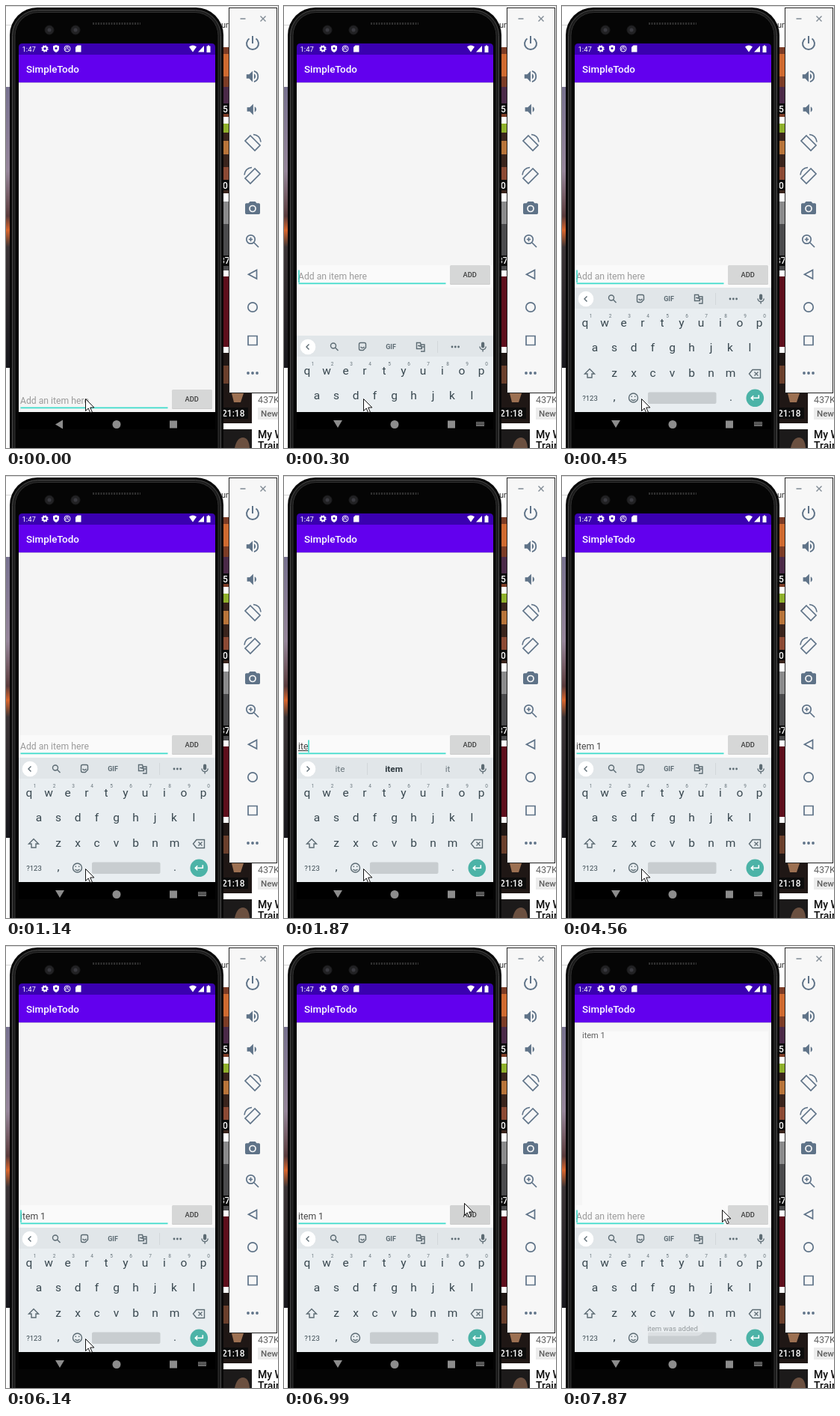
Animation of 364x590 px, one loop 8 s. Source, as an HTML page:

```html
<!DOCTYPE html>
<html lang="en">
<head>
<meta charset="utf-8">
<title>Todo app demo</title>
<style>
html, body { margin: 0; width: 100%; height: 100%; overflow: hidden; background: #fff; }
svg { display: block; }
text { font-family: Roboto, sans-serif; white-space: pre; }
.mid { text-anchor: middle; }
.tools { fill: #5f7388; stroke: #5f7388; stroke-width: 0; }
.line { fill: none; stroke-width: 2; }
.entry { font-size: 12.2px; fill: #484848; }
.typing { text-decoration: underline; }
.keys { font-size: 15.5px; fill: #38474f; }
.digits { font-size: 6.5px; fill: #68757c; }
.words { font-size: 11.8px; fill: #6b777d; }
.glyph { fill: none; stroke: #5c6b73; stroke-width: 1.4; }

.row, .board, .entries, .bars, .caret, .mouse, .press, .navUp, .navDown, .added {
  animation: 8s step-end infinite;
}
.row { animation-name: row; }
.board { animation-name: board; }
.entries { animation-name: entries; }
.bars { animation-name: bars; }
.caret { animation-name: caret; }
.mouse { animation-name: mouse; }
.press { animation-name: press; }
.navUp { animation-name: navUp; }
.navDown { animation-name: navDown; }
.added { animation-name: added; }

@keyframes row { 0% { transform: translateY(166px); } 3.75%, 100% { transform: none; } }
@keyframes board {
  0% { transform: translateY(170px); }
  3.75% { transform: translateY(64px); }
  5.625%, 100% { transform: none; }
}
/* Each entry is 24px tall, each bar 28px */
@keyframes entries {
  0%, 96.75%, 100% { transform: none; }
  20% { transform: translateY(-24px); }
  23.375% { transform: translateY(-48px); }
  25.25%, 44.5% { transform: translateY(-72px); }
  27.125% { transform: translateY(-96px); }
  48% { transform: translateY(-120px); }
  51.625% { transform: translateY(-144px); }
}
@keyframes bars {
  0%, 51.625%, 100% { transform: none; }
  20% { transform: translateY(-28px); }
  23.375% { transform: translateY(-56px); }
  25.25%, 44.5% { transform: translateY(-84px); }
  27.125% { transform: translateY(-112px); }
  48% { transform: translateY(-140px); }
}
@keyframes caret {
  0% { transform: none; opacity: 0; }
  1.875% { transform: none; opacity: 1; }
  14.25% { transform: none; opacity: 0; }
  20% { transform: translateX(6.5px); opacity: 1; }
  23.375% { transform: translateX(13px); opacity: 1; }
  25.25% { transform: translateX(24px); opacity: 1; }
  27.125% { transform: translateX(30px); opacity: 1; }
  32.875% { transform: translateX(30px); opacity: 0; }
  39.125% { transform: translateX(30px); opacity: 1; }
  44.5% { transform: translateX(24px); opacity: 1; }
  48% { transform: translateX(27px); opacity: 1; }
  51.625% { transform: translateX(34px); opacity: 1; }
  57% { transform: translateX(34px); opacity: 0; }
  63.625% { transform: translateX(34px); opacity: 1; }
  65.5% { transform: none; opacity: 1; }
  71.25% { transform: none; opacity: 0; }
  76.75% { transform: none; opacity: 1; }
  78.5% { transform: translateX(34px); opacity: 1; }
  83.875% { transform: translateX(34px); opacity: 0; }
  91.125% { transform: translateX(34px); opacity: 1; }
  96.75%, 100% { transform: none; opacity: 1; }
}
@keyframes mouse {
  0% { transform: translate(106px, 524px); }
  83.875% { transform: translate(152px, 482px); }
  85.625% { transform: translate(222px, 386px); }
  87.375% { transform: translate(241px, 343px); }
  94.875% { transform: translate(238px, 346px); }
  96.75% { transform: translate(230px, 350px); }
  98.375%, 100% { transform: translate(214px, 352px); }
}
@keyframes press { 0%, 98.375%, 100% { fill: #d6d7d7; } 87.375% { fill: #d2d3d3; } }
@keyframes navDown { 0% { opacity: 1; } 3.75%, 100% { opacity: 0; } }
@keyframes navUp { 0% { opacity: 0; } 3.75%, 100% { opacity: 1; } }
@keyframes added { 0% { opacity: 0; } 98.375%, 100% { opacity: 1; } }
</style>
</head>
<body>
<svg width="364" height="590" viewBox="0 0 364 590">
  <defs>
    <linearGradient id="city" x2="0" y2="1">
      <stop offset="0" stop-color="#77718f"/>
      <stop offset=".3" stop-color="#96869a"/>
      <stop offset=".46" stop-color="#5a3b3c"/>
      <stop offset=".51" stop-color="#d9652c"/>
      <stop offset=".57" stop-color="#3b3436"/>
      <stop offset="1" stop-color="#17171c"/>
    </linearGradient>
    <clipPath id="screen"><path d="M17 102h263v440H17z"/></clipPath>
    <clipPath id="field"><path d="M17 348h203v22H17z"/></clipPath>
    <clipPath id="strip"><path d="M17 376h263v28H17z"/></clipPath>
    <g id="mic">
      <rect x="264" y="384.500" width="4.200" height="8" rx="2.100" fill="#5c6b73"/>
      <path class="glyph" stroke-width="1.200" d="M262 390.500a4.100 4.100 0 0 0 8.200 0M266.100 394.500v3"/>
    </g>
    <g id="more">
      <circle cx="32" cy="391" r="10.300" fill="#fff"/>
      <path class="glyph" d="M30.500 387.500l3.500 3.500-3.500 3.500"/>
      <path d="M111.500 383v16M183.500 383v16" stroke="#d2d7da"/>
      <use href="#mic"/>
    </g>
  </defs>

  <!-- Page behind the emulator -->
  <path d="M0 0h364v590H0z" fill="#fff"/>
  <path d="M0 .5h364M0 25.500h8" stroke="#d8d8d8"/>
  <path d="M0 108h12v375H0z" fill="url(#city)"/>
  <text x="288" y="29" font-size="11" fill="#333">ur</text>
  <g>
    <path d="M280 55h49v93h-49z" fill="#7c3c26"/>
    <path d="M280 64h49v30h-49z" fill="#cf6a30"/>
    <path d="M280 108h49v24h-49z" fill="#4b2a48"/>
    <path d="M280 157h49v93h-49z" fill="#3a241c"/>
    <path d="M280 157h49v12h-49z" fill="#8fb02c"/>
    <path d="M280 180h49v18h-49z" fill="#b8743a"/>
    <path d="M280 215h49v17h-49z" fill="#8c4a34"/>
    <path d="M280 261h49v92h-49z" fill="#4b4b4d"/>
    <path d="M280 261h49v30h-49z" fill="#8b8b8c"/>
    <path d="M280 361h49v94h-49z" fill="#5e0f1c"/>
    <path d="M280 463h49v94h-49z" fill="#1f1715"/>
    <path d="M280 480h49v24h-49z" fill="#6a3f2c"/>
    <path d="M302 517h16l-4 12h-9z" fill="#9c7052"/>
    <path d="M280 565h49v25h-49z" fill="#1c1a1a"/>
    <path d="M306 590q3-14 11-14t9 14z" fill="#6b5040"/>
    <path d="M286 130h12v14h-12zM286 232h12v14h-12zM286 333h12v14h-12zM286 536h38v15h-38z" fill="#0c0c0c"/>
  </g>
  <g font-size="12" font-weight="500" fill="#fff">
    <text x="290" y="142">5</text>
    <text x="290" y="244">0</text>
    <text x="286" y="344">37</text>
    <text x="289" y="548">21:18</text>
  </g>
  <text x="337" y="529.500" font-size="12.500" fill="#606060">437K views</text>
  <path d="M337 536h27v16h-27z" fill="#ececec"/>
  <text x="341" y="548" font-size="11.500" font-weight="500" fill="#606060">New</text>
  <g font-size="14" font-weight="500" fill="#0a0a0a">
    <text x="337" y="577">My W</text>
    <text x="337" y="592">Train</text>
  </g>

  <!-- Phone body -->
  <rect x="5" y="2" width="286" height="640" rx="37" fill="#080808"/>
  <rect x="8.500" y="5.500" width="279" height="640" rx="34" fill="#1c1c1c" stroke="#484848"/>
  <rect x="12" y="8.500" width="272" height="640" rx="31" fill="#050505" stroke="#303030"/>
  <g fill="#222224" stroke="#1a1a1c">
    <circle cx="58" cy="32" r="6"/><circle cx="93" cy="32" r="6"/>
  </g>
  <circle cx="58" cy="32" r="2.500" fill="#3a3a40"/>
  <circle cx="93" cy="32" r="2.500" fill="#3a3a40"/>
  <path d="M116 23.500h64" stroke="#303030" stroke-width="3" stroke-dasharray="2 1.500"/>

  <!-- App -->
  <path d="M17 66V55q0-5 5-5h253q5 0 5 5v11z" fill="#3a00b0"/>
  <path d="M17 65h263v37H17z" fill="#6200ee"/>
  <path d="M17 102h263v440H17z" fill="#f5f5f5"/>
  <path d="M17 102.500h263" stroke="#cfc9d8"/>
  <path d="M17 542h263v23H17z" fill="#000"/>
  <text x="21.500" y="60.500" font-size="9.500" fill="#fff">1:47</text>
  <g fill="none" stroke="#fff">
    <circle cx="52" cy="57" r="2.700" stroke-width="2"/>
    <circle cx="52" cy="57" r="4" stroke-width="1.400" stroke-dasharray="1.600 1.540"/>
    <circle cx="82" cy="57" r="4"/>
    <path d="M80 59v-3l2-1.500 2 1.500M82 56l2 3"/>
  </g>
  <g fill="#fff">
    <path d="M67 52l4 1.500v3q0 4-4 5.500-4-1.500-4-5.500v-3z"/>
    <path d="M95.500 52.500h5v9h-7.500v-6.500z"/>
    <path d="M245 54.500q5-4 10 0l-5 7z"/>
    <path d="M257 61.500l8-8.500v8.500z"/>
    <path d="M268.500 53.500h1.500v-1h2v1h1.500v8.500h-5z"/>
  </g>
  <circle cx="67" cy="56.500" r="1.500" fill="#3a00b0"/>
  <text x="27" y="89" font-size="13.400" font-weight="500" fill="#fff">SimpleTodo</text>
  <g class="added">
    <path d="M27 114h249v232H27z" fill="#fafafa"/>
    <text x="27" y="122.500" font-size="11" fill="#5f5f5f">item 1</text>
  </g>

  <g clip-path="url(#screen)">
    <path class="navUp" d="M17 346h263v30H17z" fill="#fafafa"/>
    <g class="row">
      <g clip-path="url(#field)">
        <g class="entries entry">
          <text x="19" y="365" fill="#9b9b9b">Add an item here</text>
          <text class="typing" x="19" y="389">it</text>
          <text class="typing" x="19" y="413">ite</text>
          <text class="typing" x="19" y="437">item</text>
          <text class="typing" x="19" y="461">items</text>
          <text x="19" y="485">item </text>
          <text x="19" y="509">item 1</text>
        </g>
      </g>
      <path class="caret" d="M20 352.500v16.500" stroke="#2fd6c4" stroke-width="1.500"/>
      <path d="M19.500 370.300h197" stroke="#3fdccb" stroke-width="1.800"/>
      <rect x="222" y="347" width="54" height="25" rx="1.500" fill="#cccccc"/>
      <rect class="press" x="222" y="346" width="54" height="25" rx="1.500"/>
      <text class="mid" x="248.700" y="361.500" font-size="9.300" font-weight="500" fill="#3c3c3c">ADD</text>
    </g>

    <g class="board">
      <path d="M17 376h263v167H17z" fill="#e9eef1"/>
      <path d="M17 376h263v28H17z" fill="#e1e6e9"/>
      <g clip-path="url(#strip)">
        <g class="bars">
          <g>
            <circle cx="32" cy="391" r="10.300" fill="#fff"/>
            <g class="glyph">
              <path d="M33.500 387.500L30 391l3.500 3.500"/>
              <circle cx="66" cy="389.500" r="3.500"/>
              <path d="M68.500 392l4 4"/>
              <path d="M109.500 392v-4.500q0-2-2-2h-5q-2 0-2 2v6q0 2 2 2h3.500zM102.500 391q2.500 3 5 0"/>
              <path d="M177.500 385.500h5l2 8h-7zM183 388h5v9h-5M179 389.500h3v1.500M184.500 391h3"/>
            </g>
            <text class="mid" x="143" y="394.300" font-size="9" font-weight="700" fill="#5c6b73">GIF</text>
            <path d="M205.500 383v16" stroke="#d2d7da"/>
            <g fill="#5c6b73">
              <circle cx="225" cy="391" r="1.400"/><circle cx="229.300" cy="391" r="1.400"/><circle cx="233.600" cy="391" r="1.400"/>
            </g>
            <use href="#mic"/>
          </g>
          <g class="words mid">
            <use href="#more" y="28"/>
            <text x="75" y="423">it</text><text x="147" y="423" font-weight="700" fill="#2f3a40">it's</text><text x="219" y="423">items</text>
            <use href="#more" y="56"/>
            <text x="75" y="451">ite</text><text x="147" y="451" font-weight="700" fill="#2f3a40">item</text><text x="219" y="451">it</text>
            <use href="#more" y="84"/>
            <text x="75" y="479">item</text><text x="147" y="479">items</text><text x="219" y="479">item's</text>
            <use href="#more" y="112"/>
            <text x="75" y="507">items</text><text x="147" y="507">item's</text><text x="219" y="507">item</text>
            <use href="#more" y="140"/>
            <text x="75" y="535">is</text><text x="147" y="535">in</text><text x="219" y="535">number</text>
          </g>
        </g>
      </g>
      <g class="keys mid">
        <text y="428" x="31 57 82.500 108 134 160 186 212 238 264">qwertyuiop</text>
        <text y="461" x="44 70 96 121.500 147.500 173.500 199.500 225 251.500">asdfghjkl</text>
        <text y="495" x="70 96 121.500 147.500 173.500 199.500 225.500">zxcvbnm</text>
        <text y="527" x="70 226">,.</text>
        <text x="37.500" y="526.500" font-size="9.500">?123</text>
      </g>
      <text class="digits mid" y="416" x="38.500 64.500 90 115 141 167 193 219 245 271">1234567890</text>
      <g class="glyph">
        <path d="M37 484.500l6.500 6.500h-3.500v5h-6v-5h-3.500z"/>
        <path d="M250.500 491l4.500-5.500h10.500v11H255zM257.500 488.500l5 5m0-5l-5 5"/>
        <circle cx="95.500" cy="523" r="6"/>
        <path d="M92.500 525q3 3 6 0M93.300 520.500v1.500M97.700 520.500v1.500"/>
      </g>
      <rect x="115" y="515.500" width="91.500" height="15.500" rx="2" fill="#c8cdd0"/>
      <circle cx="258.300" cy="523.300" r="11.800" fill="#4cb3a7"/>
      <path d="M263.300 519.300v4h-10m3-3l-3 3 3 3" fill="none" stroke="#fff" stroke-width="1.600"/>
    </g>
    <g class="added">
      <rect x="105" y="500.500" width="85" height="20" rx="10" fill="#ebeef0" fill-opacity=".55"/>
      <text class="mid" x="148" y="513.500" font-size="9.600" fill="#93999c">item was added</text>
    </g>
  </g>

  <g fill="#8c8c8c">
    <path class="navDown" d="M66 558.500l10-6v12z"/>
    <g class="navUp">
      <path d="M66 553h12l-6 10z"/>
      <path d="M257 555h11v6h-11z" fill="#6c6c6c"/>
      <path d="M258 556.500h9M258 558.500h9" stroke="#111" stroke-dasharray="1 1"/>
    </g>
    <circle cx="148" cy="558.500" r="5.500"/>
    <path d="M219 553.500h10v10h-10z"/>
  </g>

  <!-- Emulator controls -->
  <rect x="298.500" y="2.500" width="64" height="514" fill="#f7f7f7" stroke="#222"/>
  <path d="M313.500 17h7M340.500 13.500l7 7m0-7l-7 7" stroke="#7f8a94" stroke-width="1.400"/>
  <g class="tools">
    <path class="line" d="M330 40v10M325.500 43.500a8 8 0 1 0 9 0"/>
    <g transform="translate(319 83) scale(.92)">
      <path d="M3 9v6h4l5 5V4L7 9zM14 8v8q2.500-1.200 2.500-4T14 8z"/>
      <path class="line" d="M14 4.300a8 8 0 0 1 0 15.400"/>
    </g>
    <path transform="translate(318 127) scale(.92)" d="M5 9v6h4l5 5V4L9 9zM16 8v8q2.500-1.200 2.500-4T16 8z"/>
    <g class="line" style="stroke-width:1.700">
      <path d="M327 173l13 13-7 7-13-13zM331 171.500q9 1 10 10"/>
      <path d="M333 217l-13 13 7 7 13-13zM329 215.500q-9 1-10 10"/>
      <circle cx="327.500" cy="311.500" r="5.700"/>
      <path d="M332 316l6 6M324.800 311.500h5.400M327.500 308.800v5.400"/>
      <path d="M335.500 352.500v11.500L324.500 358.200z"/>
      <circle cx="330" cy="402" r="6.200"/>
      <path d="M324 440.500h12v12h-12z"/>
    </g>
    <path d="M326.500 261h7l2 2.300h2.800q1.700 0 1.700 1.700v11.300q0 1.700-1.700 1.700h-16.600q-1.700 0-1.700-1.700V265q0-1.700 1.700-1.700h2.800z"/>
    <circle cx="330" cy="270.500" r="4" fill="#5f7388" stroke="#f7f7f7" stroke-width="1.700"/>
    <circle cx="324" cy="490" r="1.900"/><circle cx="330" cy="490" r="1.900"/><circle cx="336" cy="490" r="1.900"/>
  </g>

  <path class="mouse" d="M.5.500v16l3.700-3.500 2.600 6 2.500-1.100-2.600-5.900h5.200z" fill="#fff" stroke="#111"/>
</svg>
</body>
</html>
```
